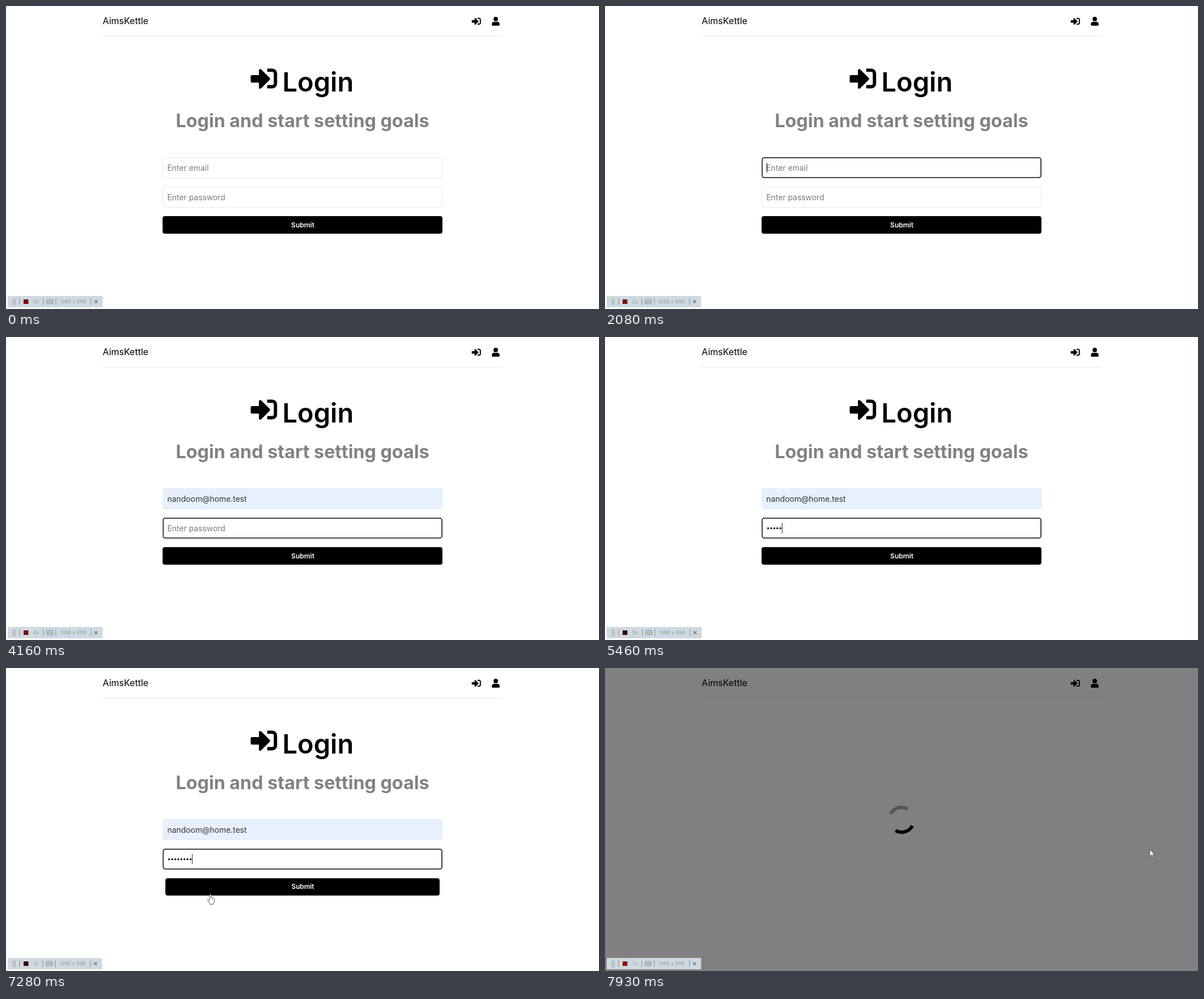
Animation of 1046x535 px, one loop 8 s. Source, as an HTML page with a canvas:

```html
<!DOCTYPE html>
<html lang="en">
<head>
<meta charset="utf-8">
<title>Login form</title>
<style>
html, body { margin: 0; width: 100%; height: 100%; overflow: hidden; background: #fff; }
canvas { display: block; }
</style>
</head>
<body>
<canvas id="stage" width="1046" height="535"></canvas>
<script>
const ctx = document.getElementById('stage').getContext('2d');
const LOOP = 8000, STEP = 130;
const SANS = 'Inter, "Open Sans", sans-serif';
const ARIAL = '"Liberation Sans", Arial, sans-serif';
const EMAIL = 'nandoom@home.test';

// Moments of the story, in ms
const FOCUS = 1820, PREVIEW = 2860, FILLED = 3120, TAB = 3250;
const MOUSE = 6760, PRESS = 7280, LOADING = 7410, LEAVE = 7540;
const KEYS = [5200, 5200, 5330, 5330, 5460, 5720, 5850, 6110];
const LAMP = [[0, '#7c0000'], [1040, '#721010'], [5200, '#380000'], [LOADING, '#b00a14'], [7670, '#930810']];
const SHIFT = [0, -3, -1, -1, 0, 0, 0, -1];

const signIn = new Path2D('M416 448h-84c-6.6 0-12-5.4-12-12v-40c0-6.6 5.4-12 12-12h84c17.7 0 32-14.3 32-32V160c0-17.7-14.3-32-32-32h-84c-6.6 0-12-5.4-12-12V76c0-6.6 5.4-12 12-12h84c53 0 96 43 96 96v192c0 53-43 96-96 96zM369 247L201 79c-15-15-41-4.5-41 17v96H24c-13.3 0-24 10.7-24 24v96c0 13.3 10.7 24 24 24h136v96c0 21.5 26 32 41 17l168-168c9.3-9.4 9.3-24.6 0-34z');
const person = new Path2D('M96 128a128 128 0 1 0 256 0a128 128 0 1 0-256 0zM134 288h17q73 32 146 0h17c74 0 134 60 134 134v42c0 26-22 48-48 48H48c-26 0-48-22-48-48v-42c0-74 60-134 134-134z');
const arrow = new Path2D('M0 0V12L2.8 9.5L4.8 14L6.8 13.1L4.9 8.8H8.6Z');
const hand = new Path2D('M-1.3 10V1Q-1.2-.4 0-.4Q1.2-.4 1.3 1V5.5L5 6.3Q6.8 6.8 6.8 8.6V11.5Q6.6 14 5.3 15.2V17.2H-1.2V15.6L-4.6 10.6Q-5.3 9.2-4 8.8Q-3 8.6-1.3 10.6Z');

function text(str, x, y, size, color, weight = 400, align = 'left', family = SANS) {
  ctx.font = `${weight} ${size}px ${family}`;
  ctx.fillStyle = color;
  ctx.textAlign = align;
  ctx.fillText(str, x, y);
}

function rect(x, y, w, h, color) {
  ctx.fillStyle = color;
  ctx.fillRect(x, y, w, h);
}

function roundBox(x, y, w, h, r, fill, stroke, line = 1) {
  ctx.beginPath();
  ctx.roundRect(x, y, w, h, r);
  ctx.fillStyle = fill;
  ctx.fill();
  if (!stroke) return;
  ctx.strokeStyle = stroke;
  ctx.lineWidth = line;
  ctx.stroke();
}

function ring(x, y, r, fill) {
  ctx.beginPath();
  ctx.arc(x, y, r, 0, 7);
  if (fill) {
    ctx.fillStyle = fill;
    ctx.fill();
  }
  ctx.stroke();
}

function icon(path, x, y, size) {
  ctx.save();
  ctx.translate(x, y);
  ctx.scale(size / 512, size / 512);
  ctx.fillStyle = '#000';
  ctx.fill(path);
  ctx.restore();
}

function cross(x, y, r) {
  ctx.beginPath();
  ctx.moveTo(x - r, y - r);
  ctx.lineTo(x + r, y + r);
  ctx.moveTo(x + r, y - r);
  ctx.lineTo(x - r, y + r);
  ctx.strokeStyle = '#6f777d';
  ctx.lineWidth = 1.5;
  ctx.stroke();
}

function header(dim) {
  text('AimsKettle', 170.5, 32, 16, '#000');
  icon(signIn, 821.5, 18.8, 16.2);
  icon(person, 857, 19, 15.7);
  rect(170.5, 53, 705, 1, dim ? '#747474' : '#e6e6e6');
}

function field(y, focused, filled) {
  const bg = filled ? '#e8f0fe' : '#fff';
  if (focused) roundBox(277.3, y + .8, 491.6, 35, 3.5, bg, '#2b2b30', 1.8);
  else roundBox(276.8, y + .3, 492.6, 36, 3.5, bg, filled ? '#e2e9f5' : '#e8e8e8');
}

function caret(x, y, on) {
  if (on) rect(x, y - 9, 1, 18, '#222');
}

function blink(t, start) {
  return Math.floor((t - start) / (STEP * 4)) % 2 === 0;
}

function form(t) {
  icon(signIn, 431.6, 104.6, 46.6);
  text('Login', 487.5, 151, 47, '#000', 600);
  text('Login and start setting goals', 523, 214, 32.25, '#828282', 700, 'center');

  const onEmail = t >= FOCUS && t < TAB;
  field(267, onEmail, t >= PREVIEW);
  if (t < PREVIEW) text('Enter email', 284.5, 290.5, 13.9, '#7b7b7b');
  else if (t < FILLED) text(EMAIL, 284.5, 290, 13.2, '#222', 400, 'left', ARIAL);
  else text(EMAIL, 284.5, 290.5, 13.9, '#333');
  caret(285, 285.5, onEmail && t < PREVIEW && blink(t, FOCUS));

  field(319, t >= TAB, false);
  const typed = KEYS.filter(k => t >= k).length;
  if (!typed) text('Enter password', 284.5, 342.5, 13.9, '#7b7b7b');
  ctx.fillStyle = '#111';
  for (let i = 0; i < typed; i++) {
    ctx.beginPath();
    ctx.arc(287.7 + i * 5.4, 337.8, 1.7, 0, 7);
    ctx.fill();
  }
  caret(Math.round(284.8 + typed * 5.4), 337.5, t >= TAB && (typed > 0 || blink(t, TAB)));

  ctx.save();
  if (t >= PRESS) {
    ctx.translate(523, 386.5);
    ctx.scale(.98, .98);
    ctx.translate(-523, -386.5);
  }
  roundBox(276.2, 371, 493.6, 31, 4, '#000');
  text('Submit', 523.5, 390.5, 12, '#fff', 600, 'center');
  ctx.restore();
}

function spinner(t) {
  const turn = (23 + (t - LOADING) * 141 / 520) * Math.PI / 180;
  const arc = (mid, color) => {
    ctx.beginPath();
    ctx.arc(523, 268, 22, turn + mid - Math.PI / 4, turn + mid + Math.PI / 4);
    ctx.strokeStyle = color;
    ctx.lineWidth = 6;
    ctx.stroke();
  };
  arc(-Math.PI / 2, '#000');
  arc(Math.PI / 2, '#555');
}

function mouse(t) {
  if (t < MOUSE) return;
  const lerp = (a, b, k) => a + (b - a) * k;
  const ease = k => k * k * (3 - 2 * k);
  const come = ease(Math.min(1, (t - MOUSE) / 390));
  const go = ease(Math.max(0, Math.min(1, (t - LEAVE) / 390)));
  const x = go ? lerp(360.5, 961, go) : lerp(560, 360.5, come);
  const y = go ? lerp(400, 320.5, go) : lerp(510, 400, come);
  const shape = come === 1 && !go ? hand : arrow;
  ctx.save();
  ctx.translate(x, y);
  ctx.fillStyle = '#fff';
  ctx.strokeStyle = '#444';
  ctx.lineWidth = .9;
  ctx.lineJoin = 'round';
  ctx.fill(shape);
  ctx.stroke(shape);
  ctx.restore();
}

function camera(x, y) {
  const bg = '#cfd9e0';
  roundBox(x - 5.5, y - 3.8, 11, 7.6, 1.5, bg, '#8d959b', 1);
  ring(x, y, 4.2, bg);
  ring(x, y, 1.8);
}

function toolbar(t) {
  const sec = Math.floor(t / 1040), dx = SHIFT[sec];
  const ink = '#959da3';
  rect(3, 512, 167.5 + dx, 20, '#cfd9e0');
  for (let i = 0; i < 5; i++) {
    rect(12, 517 + i * 2.3, 1.3, 1.3, '#737b81');
    rect(15.3, 517 + i * 2.3, 1.3, 1.3, '#737b81');
  }
  rect(30, 517, 10.5, 10, '#d6dee3');
  rect(31, 518, 8.5, 8, LAMP.filter(l => t >= l[0]).pop()[1]);
  text(sec + 's', 48, 525, 8.9, ink);
  for (const x of [24, 66 + dx, 88 + dx, 150 + dx]) rect(x - .5, 516, 1, 12, '#858d93');
  camera(77.3 + dx, 522);
  text('1366 x 699', 95 + dx, 525, 8.9, ink);
  cross(158.8 + dx, 522, 2.5);
}

function draw(now) {
  const t = Math.floor((now % LOOP) / STEP) * STEP;
  const loading = t >= LOADING;
  rect(0, 0, 1046, 535, loading ? '#808080' : '#fff');
  header(loading);
  if (loading) spinner(t);
  else form(t);
  toolbar(t);
  mouse(t);
}

const start = performance.now();
function tick() {
  draw(performance.now() - start);
  requestAnimationFrame(tick);
}
tick();
</script>
</body>
</html>
```
